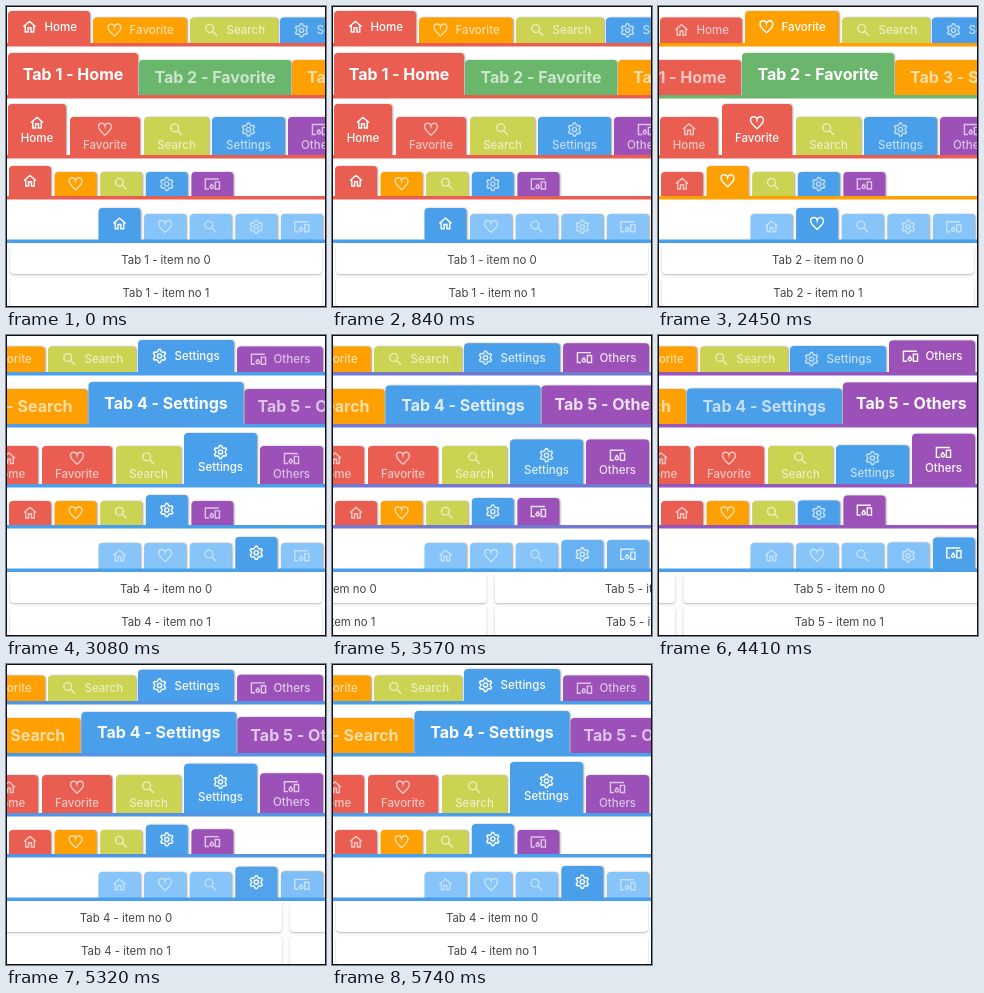
An HTML page with a canvas for the animation above (5810 ms loop, 320 px wide and 301 px high).

```html
<!DOCTYPE html>
<html lang="en">
<head>
<meta charset="utf-8">
<title>Tab bars</title>
<style>
  html, body { margin: 0; height: 100%; overflow: hidden; background: #fff; }
  canvas { display: block; width: 320px; height: 301px; }
</style>
</head>
<body>
<canvas width="320" height="301"></canvas>
<script>
const ctx = document.querySelector('canvas').getContext('2d');
const W = 320, H = 301, LOOP = 5810;
const FONT = 'Inter, "Open Sans", sans-serif';

const RED = [233, 94, 81], ORANGE = [255, 160, 2], LIME = [204, 210, 82];
const BLUE = [73, 159, 234], PURPLE = [156, 81, 184], GREEN = [106, 182, 108];
const PALE = [134, 196, 249];
const rainbow = [RED, ORANGE, LIME, BLUE, PURPLE];
const names = ['Home', 'Favorite', 'Search', 'Settings', 'Others'];

const lerp = (a, b, k) => a + (b - a) * k;
const clamp = (v, lo, hi) => Math.min(hi, Math.max(lo, v));
const mix = (a, b, k) => a.map((v, i) => lerp(v, b[i], k));
const rgb = c => `rgb(${c.map(Math.round)})`;

// Icons are strokes in a 24-unit box.
function gearPath() {
  const points = [];
  for (let i = 0; i < 24; i++) {
    const angle = (i - 0.5) * Math.PI / 12;
    const r = i % 4 < 2 ? 9.2 : 6.8;
    points.push(`${12 + r * Math.sin(angle)} ${12 - r * Math.cos(angle)}`);
  }
  return `M${points.join('L')}ZM15 12a3 3 0 1 0-6 0a3 3 0 1 0 6 0`;
}
const icons = [
  'M3.5 11.5L12 4l8.5 7.500M6 10v9h4v-6h4v6h4v-9',
  'M12 20C5 14 3 11.500 3 8.500a4.500 4.500 0 0 1 9-1.500a4.500 4.500 0 0 1 9 1.500C21 11.500 19 14 12 20Z',
  'M15 9.500a5.500 5.500 0 1 0-11 0a5.500 5.500 0 1 0 11 0M13.500 13.500L19.700 19.700',
  gearPath(),
  'M21 5H2v14h5M16 9h6v10h-6ZM13.300 16a2.300 2.300 0 1 0-4.600 0a2.300 2.300 0 1 0 4.600 0M9.500 12.500h3'
].map(d => new Path2D(d));

// spans: [left, width] of each tab; raised/low: tab tops; base: top of the underline.
const rows = [
  { raised: 5, low: 11.5, base: 37, colors: rainbow, layout: 'side',
    spans: [[2, 82], [87, 94], [184, 88], [274, 96], [373, 86]], extent: 462 },
  { raised: 47, low: 54, base: 89, colors: [RED, GREEN, ORANGE, BLUE, PURPLE], layout: 'title',
    spans: [[2, 130], [133, 152], [286, 143], [430, 155], [586, 137]], extent: 725 },
  { raised: 98, low: 111, base: 149, colors: [RED, RED, LIME, BLUE, PURPLE], layout: 'stack',
    spans: [[2, 58], [64, 70], [138, 65], [206, 73], [282, 63]], extent: 348 },
  { raised: 160, low: 166, base: 190, colors: rainbow, layout: 'icon',
    spans: [0, 1, 2, 3, 4].map(i => [3 + 45.6 * i, 42]), extent: W },
  { raised: 202, low: 208, base: 233.5, colors: Array(5).fill(BLUE), idle: PALE, layout: 'icon',
    spans: [0, 1, 2, 3, 4].map(i => [92.5 + 45.6 * i, 42]), extent: W }
];

const linear = k => k;
const easeIn = k => k * k;
const easeOut = k => 1 - (1 - k) ** 2;
const easeInOut = k => k * k * (3 - 2 * k);

// [start, end, from tab, to tab, easing]
const moves = [
  [850, 1150, 0, 1, easeInOut],
  [2620, 2940, 1, 3, easeInOut],
  [3400, 3740, 3, 4, easeInOut],
  [4200, 4410, 4, 3.934, easeIn],
  [4410, 5180, 3.934, 3.4, linear],
  [5180, 5500, 3.4, 3, easeOut]
];

function stateAt(time) {
  const move = moves.filter(m => time >= m[0]).pop();
  if (!move) return { position: 0, left: 0, right: 1, slide: 0 };
  const [start, end, from, to, ease] = move;
  const position = lerp(from, to, ease(clamp((time - start) / (end - start), 0, 1)));
  // A tapped tab slides in directly, without the pages between.
  if (to - from > 1) return { position, left: from, right: to, slide: (position - from) / (to - from) };
  const left = Math.floor(position);
  return { position, left, right: left + 1, slide: position - left };
}

function text(label, x, y, size, weight, align = 'center') {
  ctx.font = `${weight} ${size}px ${FONT}`;
  ctx.textAlign = align;
  ctx.fillText(label, x, y + size * 0.36);
}

function icon(index, x, y, size = 17) {
  ctx.save();
  ctx.translate(x - size / 2, y - size / 2);
  ctx.scale(size / 24, size / 24);
  ctx.lineWidth = 2;
  ctx.stroke(icons[index]);
  ctx.restore();
}

function shadow(alpha, blur, x, y) {
  ctx.shadowColor = `rgba(0,0,0,${alpha})`;
  ctx.shadowBlur = blur;
  ctx.shadowOffsetX = x;
  ctx.shadowOffsetY = y;
}

function box(x, y, w, h, radii, color) {
  ctx.fillStyle = color;
  ctx.beginPath();
  ctx.roundRect(x, y, w, h, radii);
  ctx.fill();
}

function drawTab(row, index, scroll, active) {
  const [left, width] = row.spans[index];
  const x = left - scroll, top = lerp(row.low, row.raised, active);
  const middle = (top + row.base) / 2, center = x + width / 2;
  const color = mix(row.idle || row.colors[index], row.colors[index], active);

  ctx.save();
  shadow(0.35, 2, 1, 0);
  box(x, top, width, row.base - top + 1, [4, 4, 0, 0], rgb(color));
  ctx.restore();

  ctx.save();
  ctx.globalAlpha = lerp(row.idle ? 0.5 : 0.65, 1, active);
  ctx.fillStyle = ctx.strokeStyle = '#fff';
  if (row.layout === 'side') {
    icon(index, x + 21.5, middle);
    text(names[index], x + 36.5, middle, 11.5, 500, 'left');
  } else if (row.layout === 'title') {
    text(`Tab ${index + 1} - ${names[index]}`, center, middle, 16, 700);
  } else if (row.layout === 'stack') {
    icon(index, center, middle - 6.5);
    text(names[index], center, middle + 8.5, 11.5, 500);
  } else {
    icon(index, center, middle);
  }
  ctx.restore();
}

function drawRow(row, position) {
  const from = Math.floor(position), to = Math.min(4, from + 1), k = position - from;
  const scrollFor = i => clamp(row.spans[i][0] + row.spans[i][1] / 2 - W / 2, 0, row.extent - W);
  const scroll = lerp(scrollFor(from), scrollFor(to), k);
  names.forEach((_, i) => drawTab(row, i, scroll, Math.max(0, 1 - Math.abs(position - i))));
  ctx.fillStyle = rgb(mix(row.colors[from], row.colors[to], k));
  ctx.fillRect(0, row.base, W, 3.5);
}

function drawPage(index, x) {
  for (let item = 0; item < 2; item++) {
    const y = 239 + 33 * item;
    ctx.save();
    shadow(0.25, 2, 0, 1);
    box(x + 4, y, W - 8, 29, 4, '#fff');
    ctx.restore();
    ctx.fillStyle = '#444';
    text(`Tab ${index + 1} - item no ${item}`, x + W / 2, y + 15, 11.4, 400);
  }
}

function draw(time) {
  const { position, left, right, slide } = stateAt(time);
  ctx.fillStyle = '#fff';
  ctx.fillRect(0, 0, W, H);
  ctx.fillStyle = '#fcfcfc';
  ctx.fillRect(0, 237, W, H - 237);
  drawPage(left, -slide * W);
  if (slide > 0) drawPage(right, (1 - slide) * W);
  rows.forEach(row => drawRow(row, position));
  ctx.strokeStyle = '#111';
  ctx.lineWidth = 1;
  ctx.strokeRect(0.5, 0.5, W - 1, H - 1);
}

function tick() {
  draw(performance.now() % LOOP);
  requestAnimationFrame(tick);
}
tick();
</script>
</body>
</html>
```
